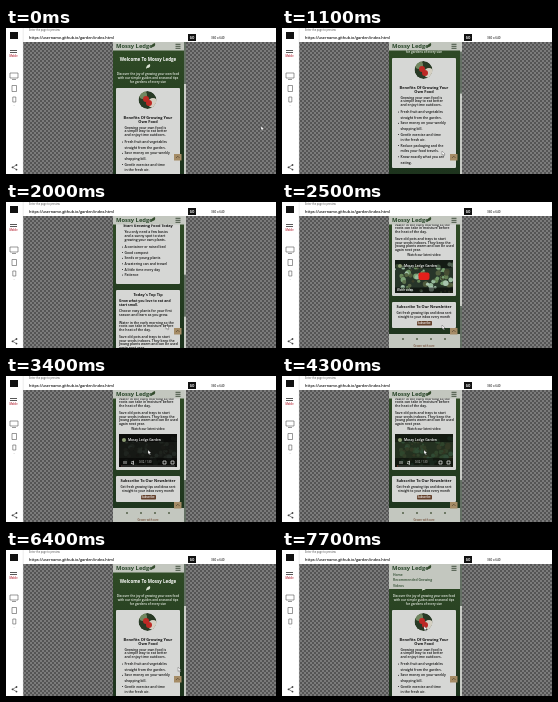
These frames come from a looping animation (270 by 146 pixels, 8000 ms). An HTML page:

```html
<!DOCTYPE html>
<html lang="en">
<head>
<meta charset="utf-8">
<title>Responsive preview</title>
<style>
html, body { margin: 0; width: 100%; height: 100%; overflow: hidden; background: #fff; }
svg { display: block; width: 100vw; height: 100vh; }
text { font-family: "Open Sans", "Liberation Sans", sans-serif; white-space: pre; }
</style>
</head>
<body>
<svg id="stage" viewBox="0 0 270 146">
  <defs>
    <pattern id="check" width="4" height="4" patternUnits="userSpaceOnUse">
      <path d="M0 0h4v4h-4z" fill="#555"/><path d="M0 0h2v2h-2zM2 2h2v2h-2z" fill="#7b7b7b"/>
    </pattern>
    <linearGradient id="shade" x2="0" y2="1">
      <stop stop-color="#304c26"/><stop offset="1" stop-color="#1d331d"/>
    </linearGradient>
    <clipPath id="screen"><path d="M107 14h73v132h-73z"/></clipPath>
    <clipPath id="round"><circle cx="141.5" cy="72" r="9"/></clipPath>
    <clipPath id="player"><path d="M113 339h58v33h-58z"/></clipPath>
  </defs>
  <path d="M17 14h253v132H17z" fill="url(#check)"/>
  <g id="bars"></g>
  <g clip-path="url(#screen)">
    <path d="M107 14h71v132h-71z" fill="url(#shade)"/>
    <g id="page"></g>
    <g id="fixed"></g>
  </g>
  <path id="cursor" d="M0 0v4.2l1-.9.8 1.7.8-.4-.8-1.6h1.3z" fill="#fff" stroke="#222" stroke-width=".3"/>
</svg>
<script>
const $ = id => document.getElementById(id);
const NAME = 'Mossy Ledge', INK = '#111', CARD = '#d6d7d5', SAND = '#c3c7bf', GREEN = '#29472a';

function add(parent, tag, attrs, content = '') {
  const el = document.createElementNS('http://www.w3.org/2000/svg', tag);
  for (const key in attrs) el.setAttribute(key, attrs[key]);
  el.textContent = content;
  return parent.appendChild(el);
}
const rect = (p, x, y, width, height, fill, rx = 0) => add(p, 'rect', { x, y, width, height, fill, rx });
const disc = (p, cx, cy, r, fill) => add(p, 'circle', { cx, cy, r, fill });
const stroke = (p, d, color = INK, width = .7) =>
  add(p, 'path', { d, fill: 'none', stroke: color, 'stroke-width': width });
const label = (p, x, y, size, content, fill = INK, weight = 600, anchor = 'start') =>
  add(p, 'text', { x, y: y + size * .35, 'font-size': size, fill, 'font-weight': weight, 'text-anchor': anchor }, content);
const center = (p, y, size, content, fill = INK, weight = 700) =>
  label(p, 142, y, size, content, fill, weight, 'middle');
const lines = (p, x, y, step, rows, weight = 600) =>
  rows.forEach((row, i) => label(p, x, y + i * step, 3.4, row, INK, weight));
const leaf = (p, x, y, fill) => add(p, 'path', { d: `M${x - 2} ${y + 2}q0-4 4-5q1 4-3 4z`, fill });

function list(p, y, rows) {
  rows.forEach((row, i) => {
    if (row[0] === '*') disc(p, 116.5, y + i * 5.6, .5, INK);
    label(p, 118.5, y + i * 5.6, 3.4, row.replace('*', ''), INK, 600);
  });
}
function photo(p, y, main) {
  const g = add(add(p, 'g', { transform: `translate(0 ${y})` }), 'g', { 'clip-path': 'url(#round)' });
  disc(g, 141.5, 72, 9, '#283a25');
  disc(g, 137, 67, 4, '#718761');
  disc(g, 147, 75, 5, '#d5d0c3');
  disc(g, 140, 71, 3, main);
  disc(g, 143, 75, 3, main);
}

// Browser tool around the phone
const bars = $('bars');
rect(bars, 0, 0, 270, 14, '#fff');
rect(bars, 0, 0, 17, 146, '#fff');
stroke(bars, 'M17.2 0v146', '#ccc', .4);
rect(bars, 4, 4, 8, 7, INK);
label(bars, 23, 2, 2.6, 'Enter the page to preview', '#555', 400);
label(bars, 23, 9.5, 3.8, 'https://username.github.io/garden/index.html', INK, 600);
rect(bars, 182, 6, 8, 7, INK);
label(bars, 186, 9.5, 3, 'GO', '#fff', 700, 'middle');
label(bars, 205, 9.5, 3, '360 x 640', '#333', 600);
stroke(bars, 'M4 22.5h7M4 24.5h7');
label(bars, 7.5, 28.5, 2.5, 'Mobile', '#b42232', 600, 'middle');
stroke(bars, 'M4 45h8v5H4zM6 51.5h4M6 57.5h4.5v6H6zM6.8 69h3v5h-3z', '#555', .6);
label(bars, 8, 77, 2.4, '...', '#555', 600, 'middle');
stroke(bars, 'M10.5 137l-4 2.3 4 2.3', '#444', .6);
[[10.5, 137], [6.5, 139.3], [10.5, 141.6]].forEach(([x, y]) => disc(bars, x, y, .9, '#444'));

// Scrolling page
const page = $('page');
center(page, 31, 4.5, 'Welcome To ' + NAME, '#fff');
leaf(page, 142, 39, '#dce5d4');
['Discover the joy of growing your own food', 'with our simple guides and seasonal tips', 'for gardens of every size'].forEach(
  (row, i) => center(page, 46 + i * 4, 3.1, row, '#e7ece3', 600));

rect(page, 110, 60, 64, 110, CARD, 1);
photo(page, 0, '#bd2924');
center(page, 89.5, 3.9, 'Benefits Of Growing Your');
center(page, 93.6, 3.9, 'Own Food');
lines(page, 118.5, 99.6, 3.6, ['Growing your own food is', 'a simple way to eat better', 'and enjoy time outdoors.']);
list(page, 114, ['*Fresh fruit and vegetables', 'straight from the garden.', '*Save money on your weekly', 'shopping bill.', '*Gentle exercise and time', 'in the fresh air.', '*Reduce packaging and the', 'miles your food travels.', '*Know exactly what you are', 'eating.']);

rect(page, 110, 177, 64, 88, CARD, 1);
photo(page, 117, '#668744');
center(page, 207, 3.9, 'Start Growing Food Today');
lines(page, 118.5, 213, 3.8, ['You only need a few basics', 'and a sunny spot to start', 'growing your own plants.']);
list(page, 228, ['*A container or raised bed', '*Good compost', '*Seeds or young plants', '*A watering can and trowel', '*A little time every day', '*Patience']);

rect(page, 110, 271, 64, 104, CARD, 1);
center(page, 276, 3.9, "Today's Top Tip");
lines(page, 113, 282, 4, ['Grow what you love to eat and', 'start small.'], 700);
lines(page, 113, 292, 4, ['Choose easy plants for your first', 'season and learn as you grow.']);
lines(page, 113, 303.5, 3.7, ['Water in the early morning so the', 'roots can take in moisture before', 'the heat of the day.']);
lines(page, 113, 318, 3.5, ['Save old pots and trays to start', 'your seeds indoors. They keep the', 'young plants warm and can be used', 'again next year.']);
center(page, 334, 3.1, 'Watch our latest video', INK, 600);

const video = add(page, 'g', { 'clip-path': 'url(#player)' });
const backdrop = rect(video, 113, 339, 58, 33, '#273529');
let seed = 9;
const random = () => (seed = seed * 16807 % 2147483647) / 2147483647;
const foliage = Array.from({ length: 75 }, () => {
  const x = 113 + random() * 58, y = 343 + random() * 29;
  return { x, hue: random(), el: disc(video, x, y, .7 + random() * 2.2, '#666') };
});
rect(video, 113, 339, 58, 8, 'rgba(0,0,0,.48)');
disc(video, 118, 345, 2, '#8e9f74');
label(video, 122, 345, 3.3, NAME + ' Garden', '#fff', 600);
const poster = add(video, 'g', {});
rect(poster, 136.5, 351.5, 11, 7.5, '#e3201b', 2);
rect(poster, 113, 366.5, 58, 5.5, 'rgba(0,0,0,.55)');
label(poster, 115, 369, 2.7, 'Watch video', '#fff', 600);
const controls = add(video, 'g', {});
rect(controls, 113, 363, 58, 9, 'rgba(0,0,0,.5)');
stroke(controls, 'M118 366v3M120 366v3M125 367h1l1.5-1v3.5l-1.5-1h-1M157 366h3v3h-3zM165 366h3v3h-3z', '#fff', .65);
label(controls, 133, 367.5, 2.6, '0:02 / 1:30', '#ddd', 400);
stroke(controls, 'M115 371h54', '#777', .6);
const progress = rect(controls, 115, 370.7, 0, .6, '#e3201b');

rect(page, 110, 381, 64, 26, CARD, 1);
center(page, 385.5, 3.9, 'Subscribe To Our Newsletter');
center(page, 392, 3.1, 'Get fresh growing tips and ideas sent', INK, 600);
center(page, 396, 3.1, 'straight to your inbox every month', INK, 600);
rect(page, 135, 400, 15, 4.5, '#65412c', .7);
center(page, 402.2, 2.8, 'Subscribe', '#fff', 600);
rect(page, 107, 413, 71, 14, SAND);
[121, 135, 149, 163].forEach(x => disc(page, x, 418, 1, '#536049'));
center(page, 425, 2.7, 'Grown with care', '#76513b', 600);

// Header, menu, scroll bar and return button
const fixed = $('fixed');
const menu = add(fixed, 'g', {});
rect(menu, 107, 22, 71, 17, SAND);
['Home', 'Recommended Growing', 'Videos'].forEach((row, i) => label(menu, 111, 24.5 + i * 5.8, 3.4, row, GREEN, 600));
rect(fixed, 107, 14, 71, 8.5, SAND);
label(fixed, 110, 18.2, 5.8, NAME, GREEN, 700);
leaf(fixed, 147, 18, '#344c2d');
stroke(fixed, 'M169.5 16.3h5M169.5 18.3h5M169.5 20.3h5', '#243522', .8);
const toTop = rect(fixed, 168, 126, 7.5, 6.5, '#a58c66');
stroke(fixed, 'M170 130l1.8-1.8 1.8 1.8', '#503e2a', .6);
rect(fixed, 178, 14, 2, 132, '#c8cbc5');
const thumb = rect(fixed, 178, 14, 2, 42, '#647064');

const clamp = v => Math.max(0, Math.min(1, v));
const ease = u => u * u * (3 - 2 * u);
function track(keys, t) {
  const i = keys.findIndex(k => k[0] > t);
  if (i < 0) return keys[keys.length - 1].slice(1);
  const a = keys[i - 1], b = keys[i], u = ease((t - a[0]) / (b[0] - a[0]));
  return a.slice(1).map((v, n) => v + (b[n + 1] - v) * u);
}
const scrollKeys = [[0, 0], [500, 0], [1100, 30], [1300, 45], [2000, 183], [2450, 281], [5550, 281], [6250, 0]];
const cursorKeys = [[0, 255, 98], [150, 255, 98], [800, 160, 123], [2500, 160, 123], [2850, 142, 74],
  [4400, 142, 74], [5200, 172, 129], [6300, 172, 129], [6800, 172, 18], [7300, 172, 18], [7700, 142, 76]];

function draw(t) {
  const [scroll] = track(scrollKeys, t);
  const [x, y] = track(cursorKeys, t);
  const playing = t >= 2900;
  const green = ease(clamp((t - 3600) / 1300));
  page.setAttribute('transform', `translate(0 ${-scroll})`);
  thumb.setAttribute('y', 14 + scroll * 90 / 281);
  $('cursor').setAttribute('transform', `translate(${x} ${y})`);
  menu.style.display = t >= 6900 ? '' : 'none';
  poster.style.display = playing ? 'none' : '';
  controls.style.display = playing ? '' : 'none';
  progress.setAttribute('width', clamp((t - 2900) / 90000) * 54);
  toTop.setAttribute('fill', t > 5150 && t < 6400 ? '#80623b' : '#a58c66');
  backdrop.setAttribute('fill', playing ? `hsl(105 ${10 + 20 * green}% ${9 + 12 * green}%)` : '#273529');
  foliage.forEach(({ x, hue, el }) => {
    const light = playing ? 8 + hue * 8 + green * 17 : 20 + hue * 55;
    el.setAttribute('fill', `hsl(${70 + hue * 70} ${playing ? 8 + green * 25 : 20}% ${light}%)`);
    el.setAttribute('cx', x + (playing ? Math.sin((t - 2900) / 1400 + hue * 6) : 0));
  });
}
const start = performance.now();
function tick(now) {
  draw(Math.max(0, now - start) % 8000);
  requestAnimationFrame(tick);
}
draw(0);
requestAnimationFrame(tick);
</script>
</body>
</html>
```
